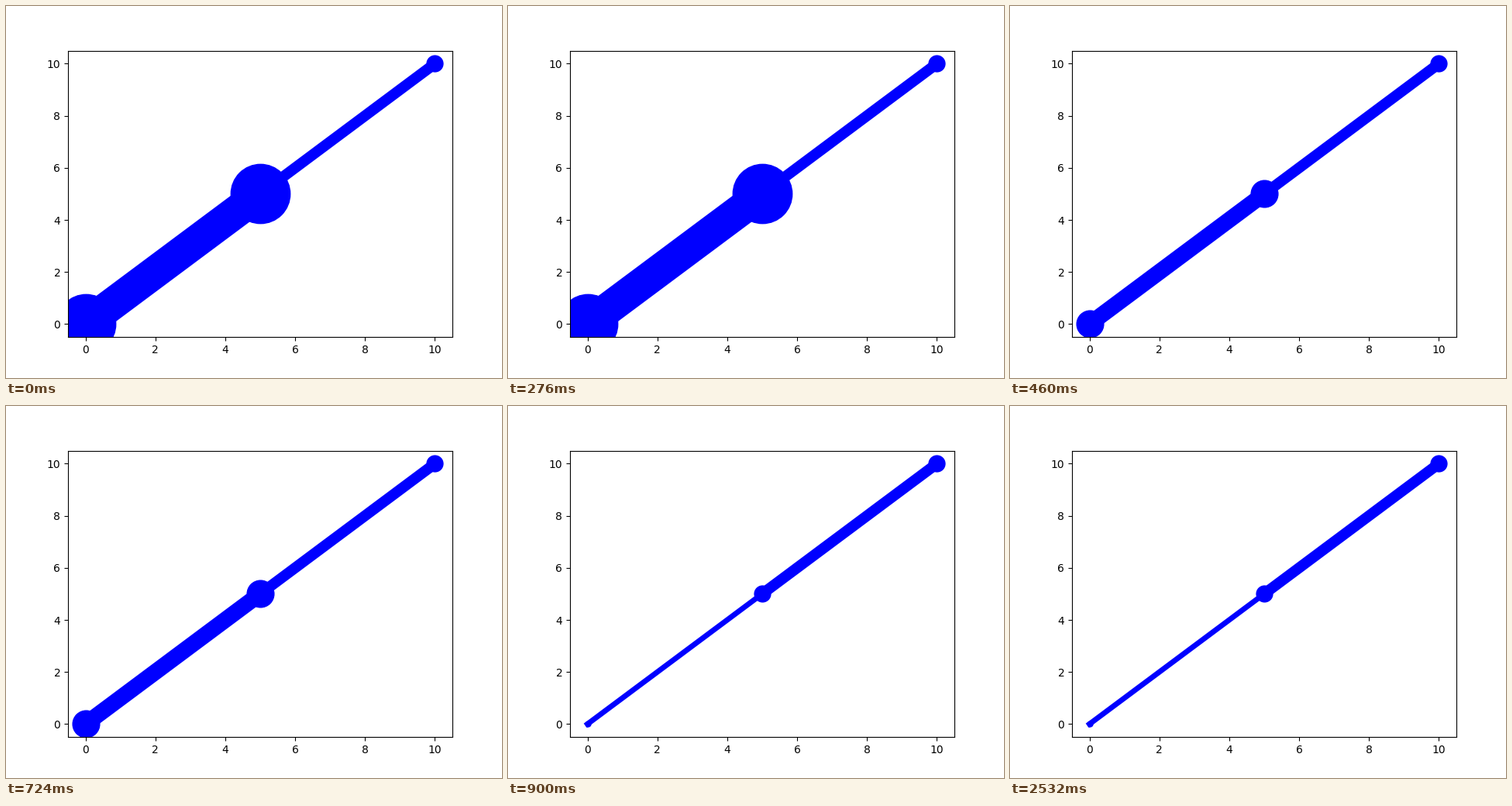
Recreate the animation shown at these times as a matplotlib script. Size 640 by 480 pixels, loop 3.62 s.

```python
import matplotlib.pyplot as plt
from matplotlib.animation import FuncAnimation

STEP = 20     # ms per animation frame
LOOP = 3620   # ms per loop
STAGES = [(0, 30), (460, 15), (900, 5)]  # start in ms, line width in points


def set_width(line, width):
    line.set_linewidth(width)
    line.set_markersize(2 * width - 5)


fig, ax = plt.subplots(figsize=(6.4, 4.8), dpi=100)
lower, = ax.plot([0, 5], [0, 5], "-o", color="blue")
upper, = ax.plot([5, 10], [5, 10], "-o", color="blue")
ax.set_xlim(-0.5, 10.5)
ax.set_ylim(-0.5, 10.5)
set_width(upper, 10)


def update(frame):
    now = frame * STEP
    width = [w for start, w in STAGES if start <= now][-1]
    set_width(lower, width)
    return lower,


anim = FuncAnimation(fig, update, frames=LOOP // STEP, interval=STEP,
                     repeat=True, repeat_delay=0, blit=False)
plt.show()
```
